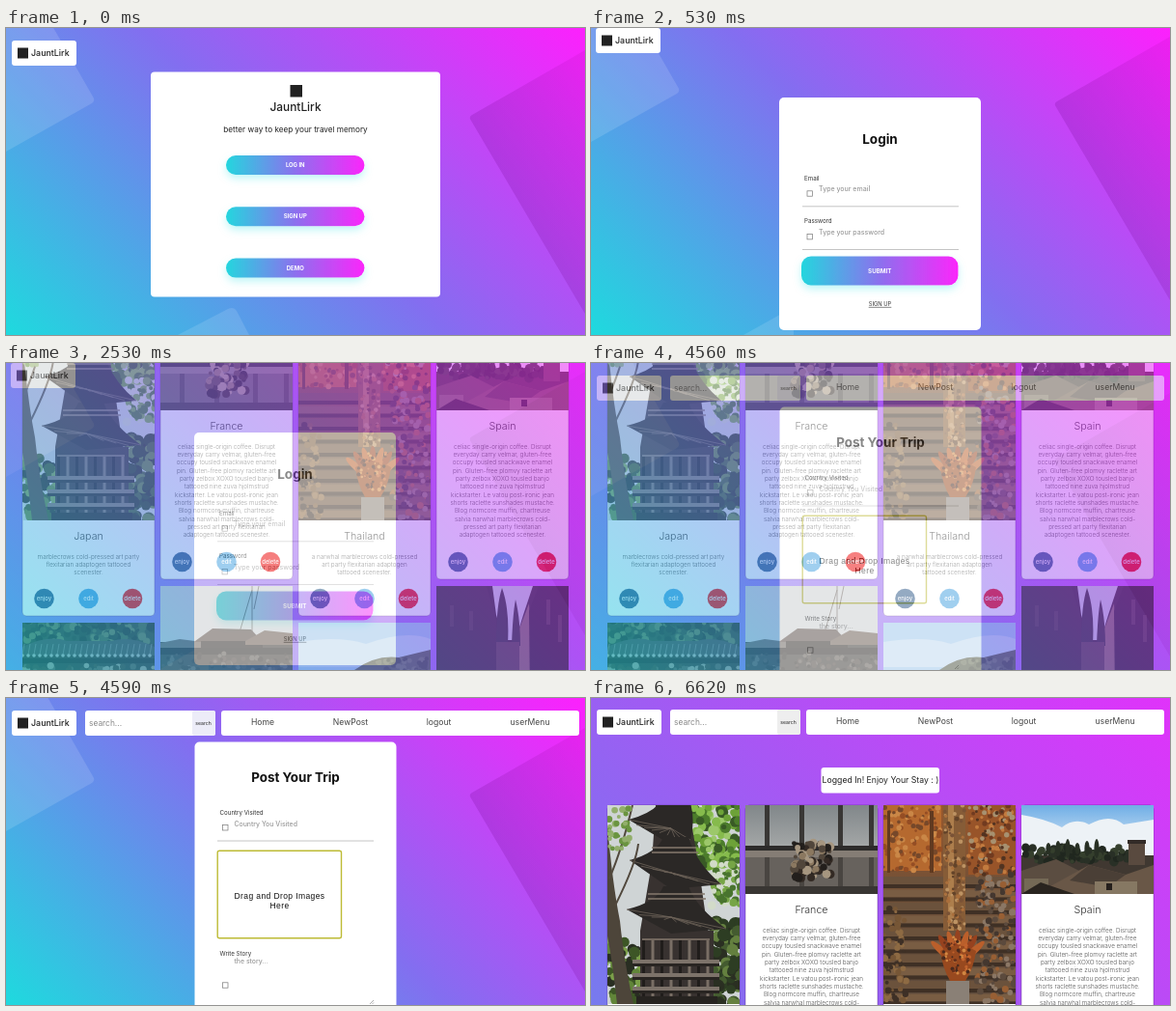
Animation, 600 px wide and 318 px high, one loop 8 s. Source, as an HTML page:

```html
<!DOCTYPE html>
<html lang="en">
<head>
<meta charset="utf-8">
<title>Travel diary walkthrough</title>
<style>
  html, body { margin: 0; width: 100%; height: 100%; overflow: hidden; }
  #stage { display: block; width: 100vw; height: 100vh; font-family: Inter, "Open Sans", sans-serif; }
</style>
</head>
<body>
<svg id="stage" viewBox="0 0 600 318" preserveAspectRatio="none"></svg>
<script>
const BRAND = 'JauntLirk';
const LOOP = 8000, BLEND = 30;
const CUTS = [500, 2530, 4560, 6590];

// ---- drawing helpers, each returns SVG markup ----
const rect = (x, y, w, h, fill, r = 0, extra = '') =>
  `<rect x="${x}" y="${y}" width="${w}" height="${h}" rx="${r}" fill="${fill}" ${extra}/>`;
const path = (d, fill, extra = '') => `<path d="${d}" fill="${fill}" ${extra}/>`;
const stroke = (d, color, width = 1) => path(d, 'none', `stroke="${color}" stroke-width="${width}"`);
const disc = (x, y, r, fill) => `<circle cx="${x}" cy="${y}" r="${r}" fill="${fill}"/>`;

// y is the middle of the lowercase letters
const text = (str, x, y, size, fill = '#222', weight = 400, anchor = 'middle', extra = '') =>
  `<text x="${x}" y="${y + size * 0.33}" font-size="${size}" fill="${fill}" font-weight="${weight}" text-anchor="${anchor}" ${extra}>${str}</text>`;
const leftText = (str, x, y, size, fill, weight) => text(str, x, y, size, fill, weight, 'start');

const repeat = (n, draw) => Array.from({ length: n }, (_, i) => draw(i)).join('');

// loose dots for foliage, stone and ornament
function scatter(seed, n, x, y, w, h, r, colors) {
  let s = seed;
  const rnd = () => (s = (s * 16807) % 2147483647) / 2147483647;
  rnd();
  return repeat(n, i => disc(
    (x + rnd() * w).toFixed(1), (y + rnd() * h).toFixed(1),
    (r * (0.5 + rnd() * 0.7)).toFixed(1), colors[i % colors.length]));
}

// diagonal brand gradient; from/to are its positions at the bottom left and top right corners
function backdropGradient(id, from, to) {
  const end = t => (t - from) / (to - from);
  const px = t => 70.5 + 459 * end(t), py = t => 388.5 - 459 * end(t);
  return `<linearGradient id="${id}" gradientUnits="userSpaceOnUse" x1="${px(0)}" y1="${py(0)}" x2="${px(1)}" y2="${py(1)}">
    <stop stop-color="#1edade"/><stop offset=".5" stop-color="#836ef0"/><stop offset="1" stop-color="#fd20fd"/></linearGradient>`;
}

const defs = `<defs>
  ${backdropGradient('page', 0, 1)}
  ${backdropGradient('galleryLow', 0.38, 0.84)}
  ${backdropGradient('galleryTop', 0.44, 0.88)}
  <linearGradient id="pill"><stop stop-color="#24d6de"/><stop offset=".5" stop-color="#8c70ee"/><stop offset="1" stop-color="#fb26fb"/></linearGradient>
  <linearGradient id="shade" x1="1" y1="0" x2="0" y2="1"><stop stop-color="#808" stop-opacity=".1"/><stop offset="1" stop-color="#508" stop-opacity=".26"/></linearGradient>
  <linearGradient id="sky" x2="0" y2="1"><stop stop-color="#6faee6"/><stop offset=".55" stop-color="#e4eef6"/></linearGradient>
  <linearGradient id="stone" x2="0" y2="1"><stop stop-color="#99582c"/><stop offset=".45" stop-color="#705038"/><stop offset="1" stop-color="#5c4a3c"/></linearGradient>
  <linearGradient id="pane" x2="0" y2="1"><stop stop-color="#81878a"/><stop offset="1" stop-color="#a3a6a6"/></linearGradient>
  <filter id="glow" x="-20%" y="-60%" width="140%" height="260%"><feDropShadow dx="0" dy="4" stdDeviation="4" flood-color="#00dbde" flood-opacity=".25"/></filter>
</defs>`;

// ---- page furniture ----
// cornerL: right tip of the pale square, cornerR: left tip of the dark one
function backdrop(cornerL, cornerR) {
  return rect(0, 0, 600, 318, 'url(#page)') +
    path(`M0 0H${92 - cornerL * 0.57}L90 ${cornerL - 4}Q93 ${cornerL} 89 ${cornerL + 3}L0 ${cornerL + 53}Z`, '#fff', 'opacity=".13"') +
    path(`M600 ${cornerR - 69}L483 ${cornerR - 2}Q479 ${cornerR} 482 ${cornerR + 4}L600 ${cornerR + 204}Z`, 'url(#shade)');
}
const logo = (x, y) => rect(x, y, 67, 26, '#fff', 3) + rect(x + 6, y + 7.5, 11, 11, '#222') +
  leftText(BRAND, x + 20, y + 13, 8.9, '#222', 500);
const pill = (x, y, w, h, label, size) =>
  rect(x, y, w, h, 'url(#pill)', 10, 'filter="url(#glow)"') + text(label, x + w / 2, y + h / 2, size, '#fff', 700);
const underline = y => stroke(`M219 ${y}H381`, '#b5b5b5', 0.8);
const box = (x, y) => rect(x - 2.7, y - 2.7, 5.4, 5.4, 'none', 0, 'stroke="#777" stroke-width=".7"');

function navBar(buttonFill, y) {
  const links = { Home: 266, NewPost: 357, logout: 448.5, userMenu: 543 };
  return logo(6, y) + rect(82, y, 135, 26, '#fff', 3) + rect(193, y, 24, 26, buttonFill, 2) +
    leftText('search...', 86, y + 13, 8.4, '#888') + text('search', 204.5, y + 13, 5.1, '#222') +
    rect(223, y, 371, 26, '#fff', 3) +
    Object.entries(links).map(([label, x]) => text(label, x, y + 12.5, 8.6, '#444')).join('');
}

// ---- flat stand-ins for the photographs, 137 wide ----
const photos = {
  pagoda: () => {
    const eave = (x1, y1, x2, y2) =>
      path(`M${x1} ${y1}Q52 ${y1 - 8} 58 ${y1 - 24}H84Q92 ${y2 - 22} ${x2} ${y2}L66 ${y2 + 5}Z`, '#2b2826') +
      repeat(9, i => stroke(`M66 ${y2 - 12}L${x1 + (x2 - x1) * i / 8} ${y1 + (y2 - y1) * i / 8 + (i % 8 ? 3 : 0)}`, '#6d6259', 0.8));
    return rect(0, 0, 137, 206, '#cfd4d5') +
      scatter(21, 190, 70, -4, 70, 68, 5, ['#6da238', '#86bb4c', '#4c7c2c', '#9cc86a', '#395a26']) +
      scatter(33, 80, 108, 56, 32, 48, 4, ['#76a546', '#d2dbc9', '#49742f']) +
      scatter(5, 130, 98, 118, 42, 90, 6, ['#445b30', '#2d3d23', '#64803f', '#2a2f22']) +
      scatter(9, 90, -4, 140, 46, 68, 5, ['#3d5626', '#618539', '#292e22', '#7ba049']) +
      path('M50 0H84L94 60L104 130H110V206H34V130L46 60Z', '#383230') +
      eave(22, 15, 86, 36) + eave(23, 57, 118, 82) + eave(20, 108, 123, 128) +
      stroke('M46 44H92M46 49H94M42 92H101M42 97H102M36 139H106', '#857a6e', 1.3) +
      repeat(8, i => rect(36 + i * 9.5, 140, 3, 62, i % 2 ? '#796e65' : '#201d1b')) +
      repeat(3, i => rect(26, 160 + i * 14, 90, 4, '#7d736a') + rect(26, 164 + i * 14, 90, 3, '#292522')) +
      rect(30, 198, 84, 8, '#262320') +
      path('M0 20Q5 80 13 120Q17 160 27 206H10Q5 160 0 136Z', '#4d453a') +
      stroke('M2 76Q15 46 26 0M8 104Q30 60 32 40', '#51483d', 2) +
      scatter(13, 40, -3, 0, 26, 45, 3, ['#6a9440', '#92ae6b']);
  },
  locks: () => rect(0, 0, 137, 92, '#605d5a') + rect(0, 0, 137, 42, 'url(#pane)') +
    rect(0, 54, 137, 38, '#67625d') + rect(0, 42, 137, 5, '#2d2b2a') + rect(0, 47, 137, 7, '#857d75') +
    [20, 56, 96, 128].map(x => rect(x, 0, 5, 42, '#393735') + rect(x, 54, 5, 38, '#494541')).join('') +
    rect(0, 84, 137, 8, '#393633') +
    scatter(17, 85, 50, 39, 38, 38, 4, ['#332a24', '#51463b', '#8b7860', '#231f1c', '#a69680']),
  temple: () => rect(0, 0, 137, 206, 'url(#stone)') +
    rect(0, 0, 60, 68, '#b5692f') + scatter(41, 120, 0, 0, 60, 68, 2.5, ['#944d24', '#ca8747', '#76482a']) +
    rect(4, 6, 3, 64, '#613a20') + rect(48, 6, 4, 64, '#613a20') +
    rect(88, 0, 49, 72, '#985429') + scatter(43, 130, 88, 0, 49, 72, 2.5, ['#c27b3f', '#713b20', '#513321', '#a79170']) +
    repeat(10, i => rect(0, 74 + i * 13.5, 137, 8, i % 2 ? '#795d43' : '#6b523c') + rect(0, 82 + i * 13.5, 137, 4, '#3f3025')) +
    scatter(47, 75, 0, 105, 24, 101, 3, ['#3e3026', '#765636', '#8d6a43']) +
    scatter(51, 160, 96, 66, 41, 140, 3, ['#5b4a3d', '#8b7765', '#44372f', '#985f34']) +
    rect(62, 0, 23, 130, '#865c37') + rect(67, 0, 6, 130, '#ad7e4c') +
    scatter(59, 110, 63, 0, 21, 130, 2, ['#aa6f3c', '#634329', '#bd9363', '#795236']) +
    repeat(7, i => `<ellipse cx="77" cy="144" rx="3.6" ry="15" fill="${i % 2 ? '#96421f' : '#ba5f2b'}" transform="rotate(${(i - 3) * 16} 77 166)"/>`) +
    path('M59 151Q77 140 96 151Q94 168 85 182H69Q61 168 59 151Z', '#98491f') +
    scatter(53, 60, 62, 136, 29, 40, 1.8, ['#d28742', '#65301c', '#c1622d', '#4a2a1d']) +
    rect(65, 182, 24, 24, '#8a8076'),
  village: () => rect(0, 0, 137, 92, 'url(#sky)') +
    path('M0 10Q25 14 42 23Q55 12 70 20Q92 8 106 20L137 15V56H0Z', '#edf2f6') +
    rect(0, 52, 137, 40, '#403831') + scatter(67, 100, 0, 43, 110, 16, 4, ['#293026', '#353f2d', '#20271f']) +
    repeat(6, i => `<ellipse cx="${28 + i * 10}" cy="45" rx="2.6" ry="${6 + i % 3 * 2}" fill="#283024"/>`) +
    rect(111, 38, 17, 24, '#594a3f') + rect(110, 36, 19, 4, '#322b27') +
    path('M0 68L36 56L62 69V92H0Z', '#5b4d41') + path('M30 84L70 62L108 72L137 62V92H30Z', '#695747') +
    path('M70 62L108 72L90 85L50 78Z', '#4a3f36') + rect(76, 79, 44, 13, '#867863') +
    rect(3, 76, 25, 16, '#746956') + path('M0 92L20 80L55 92Z', '#29241f') + rect(88, 81, 6, 7, '#241f1c'),
  tileRoof: () => rect(0, 0, 137, 206, '#2a2926') + rect(0, 0, 137, 22, '#283426') +
    scatter(71, 120, 0, -4, 137, 24, 4, ['#202b1f', '#3c4e32', '#576743', '#1a211a']) +
    path('M0 25Q28 12 46 19H92Q112 13 137 25V34H0Z', '#3b3d3e') +
    repeat(23, i => stroke(`M${i * 6} 33L${i * 6 + 2} 22`, '#686b6c', 1) + disc(i * 6, 34, 1.8, '#a4a6a5')) +
    rect(0, 37, 137, 5, '#1d1b1a') +
    scatter(73, 90, 0, 44, 137, 20, 3, ['#4c4942', '#8d887e', '#353129']),
  harbour: () => rect(0, 0, 137, 206, '#c9cdd0') + rect(0, 58, 137, 148, '#373430') +
    stroke('M95 0V66M97 24L102 0M95 4L82 48', '#625b55', 0.9) +
    path('M0 59L20 55L44 58V66H0Z', '#655e58') + path('M36 57L54 44L94 45L106 58H36Z', '#514540') +
    rect(42, 57, 64, 12, '#282421') + path('M88 57L108 46L137 49V61H88Z', '#65564c') +
    rect(0, 64, 137, 7, '#24211f') + scatter(79, 80, 0, 70, 137, 20, 2.5, ['#2b2825', '#58534d', '#433c37']),
  hills: () => rect(0, 0, 137, 206, '#9cc5eb') +
    path('M0 20Q42 13 70 22Q112 7 137 17V46H0Z', '#bed8ef') +
    path('M58 49Q80 33 104 36L137 28V206H42Z', '#49503f') +
    scatter(83, 45, 78, 37, 60, 18, 3, ['#343b2e', '#5f6650']),
  alley: () => rect(0, 0, 137, 206, '#1f1c1a') + path('M58 0H100L90 30L82 56H70L62 30Z', '#bfcbd5') +
    path('M0 0H52L62 34L68 206H0Z', '#24201d') + path('M86 44L96 18L104 206H80Z', '#71614f') +
    path('M106 0H137V206H98L96 26Z', '#191715') +
    path('M62 58Q62 20 68 2Q76 24 74 60ZM78 62Q79 30 82 14Q87 34 87 62Z', '#1d241e') +
    rect(62, 58, 24, 32, '#3e352e') +
    stroke('M16 20V42M36 26V46M116 14V40M128 30V58', '#342d28', 4)
};

// ---- gallery ----
const LONG_STORY = ['celiac single-origin coffee. Disrupt', 'everyday carry velmar, gluten-free',
  'occupy tousled snackwave enamel', 'pin. Gluten-free plomvy raclette art', 'party zelbox XOXO tousled banjo',
  'tattooed nine zuva hjolmstrud', 'kickstarter. Le vatou post-ironic jean', 'shorts raclette sunshades mustache.',
  'Blog normcore muffin, chartreuse', 'salvia narwhal marblecrows cold-',
  'pressed art party flexitarian', 'adaptogen tattooed scenester.'];
const CARDS = [
  { x: 17, name: 'Japan', picture: 'pagoda', next: 'tileRoof', tall: true,
    story: ['marblecrows cold-pressed art party', 'flexitarian adaptogen tattooed', 'scenester.'] },
  { x: 160, name: 'France', picture: 'locks', next: 'harbour', story: LONG_STORY },
  { x: 303, name: 'Thailand', picture: 'temple', next: 'hills', tall: true,
    story: ['a narwhal marblecrows cold-pressed', 'art party flexitarian adaptogen', 'tattooed scenester.'] },
  { x: 446, name: 'Spain', picture: 'village', next: 'alley', story: LONG_STORY }
];
const ACTIONS = [['enjoy', '#285486', 22.5], ['edit', '#409fe0', 68.5], ['delete', '#ed0000', 114]];

const photo = (name, x, y, h) => `<svg x="${x}" y="${y}" width="137" height="${h}">${photos[name]()}</svg>`;

function card({ x, name, picture, next, tall, story }, top) {
  const photoH = tall ? 206 : 92, cardH = tall ? 305 : 267, mid = x + 68.5;
  const copyY = top + photoH, actionY = top + cardH - 18;
  return rect(x, top, 137, cardH, '#fff', 4, 'stroke="#3a0a70" stroke-opacity=".35"') + photo(picture, x, top, photoH) +
    text(name, mid, copyY + 16.5, 10.7, '#333', 300) +
    story.map((line, i) => text(line, mid, copyY + 37.5 + i * 8.35, 6.35, '#555', 300)).join('') +
    ACTIONS.map(([label, fill, dx]) =>
      disc(x + dx, actionY, 10.3, fill) + text(label, x + dx, actionY, 5.9, '#fff', 500)).join('') +
    photo(next, x, top + cardH + 7, photoH);
}
const gallery = (fill, top) => rect(0, 0, 600, 318, `url(#${fill})`) + CARDS.map(c => card(c, top)).join('');

// ---- scenes ----
const welcome = () => backdrop(75, 92) +
  path('M178 318L230 291Q236 288 239 293L252 318Z', '#fff', 'opacity=".12"') +
  logo(6, 13) + rect(150, 45.5, 300, 233, '#fff', 4) +
  rect(294.5, 59, 12.5, 12.5, '#222') + text(BRAND, 300, 82, 11.9, '#222', 500) +
  text('better way to keep your travel memory', 300, 105.5, 8.2, '#222') +
  ['LOG IN', 'SIGN UP', 'DEMO'].map((label, i) => pill(228, 132 + i * 53.3, 143.5, 20, label, 5.9)).join('');

const field = (label, hint, y) => leftText(label, 221, y, 6.2, '#333') +
  leftText(hint, 236, y + 11.5, 7, '#999', 500) + box(226.7, y + 16) + underline(y + 29.3);

const login = () => backdrop(65, 78) +
  path('M158 318L210 289V318Z', '#fff', 'opacity=".12"') +
  logo(5, 0) + rect(195, 72, 209, 241, '#fff', 5) + text('Login', 299.5, 116, 13.5, '#111', 700) +
  field('Email', 'Type your email', 155.5) + field('Password', 'Type your password', 200.2) +
  pill(218, 236.5, 162.5, 30, 'SUBMIT', 6.2) +
  text('SIGN UP', 299.5, 286, 5.8, '#333', 400, 'middle', 'text-decoration="underline"');

const dropText = (str, y) => text(str, 283.5, y, 8.5, '#111', 400, 'middle',
  'letter-spacing=".4" font-family="Liberation Sans, Arial, sans-serif"');
const newPost = () => backdrop(85, 100) + navBar('#ececf8', 13) +
  rect(195.5, 45.5, 209, 290, '#fff', 5) + text('Post Your Trip', 300, 82.5, 13.4, '#111', 700) +
  leftText('Country Visited', 221.5, 118.7, 6.2, '#333') + leftText('Country You Visited', 236.5, 130.3, 6.9, '#999', 500) +
  box(227.3, 134.3) + underline(148) +
  rect(219.2, 158.2, 128.3, 90.6, '#fff', 2, 'stroke="#bdbb35" stroke-width="1.4"') +
  dropText('Drag and Drop Images', 205) + dropText('Here', 215) +
  leftText('Write Story', 221.5, 265, 6.2, '#333') + leftText('the story...', 236.5, 273.2, 6.9, '#999', 500) +
  box(227.3, 297.5) + stroke('M377 317L381 313M379.5 317L381 315.5', '#777', 0.6);

const signedIn = () => gallery('galleryTop', 111) + navBar('#eee', 12) +
  rect(238.5, 72, 122.5, 26.5, '#fff', 3) + text('Logged In! Enjoy Your Stay : )', 300, 85.2, 8.7, '#222');

const scenes = [welcome, login, () => gallery('galleryLow', -43), newPost, signedIn];
const stage = document.getElementById('stage');
stage.innerHTML = defs + scenes.map(draw => `<g class="scene">${draw()}</g>`).join('');
const layers = [...stage.querySelectorAll('.scene')];

// hold each scene, with one short half-and-half mix at every cut
function render(t) {
  const current = CUTS.filter(cut => t >= cut).length;
  const mixing = current > 0 && t < CUTS[current - 1] + BLEND;
  layers.forEach((layer, i) => {
    const visible = i === current || (mixing && i === current - 1);
    layer.style.display = visible ? '' : 'none';
    layer.style.opacity = mixing && i === current ? 0.5 : 1;
  });
}

const start = performance.now();
function tick() {
  render((performance.now() - start) % LOOP);
  requestAnimationFrame(tick);
}
tick();
</script>
</body>
</html>
```
